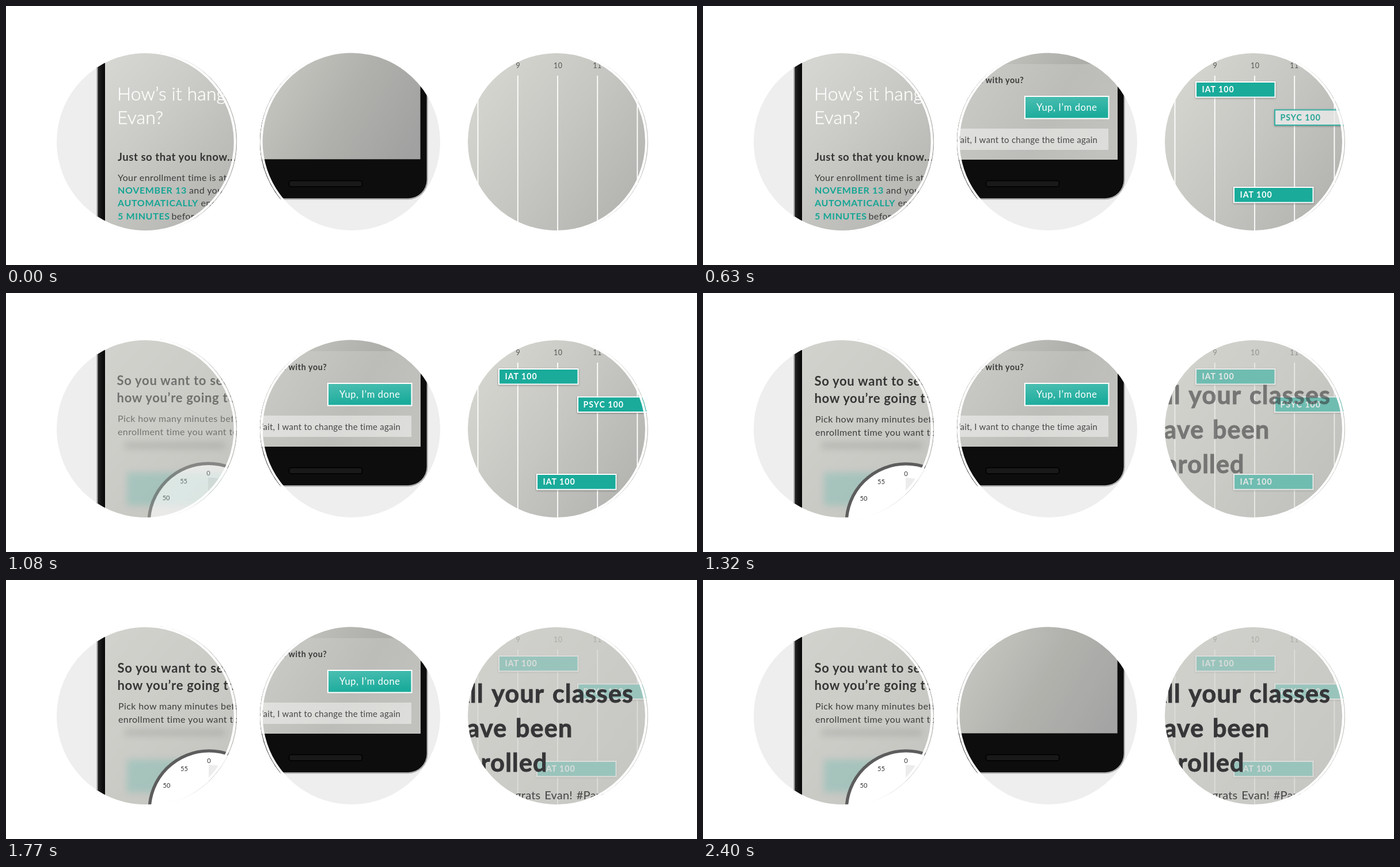
Animation, 1200 px wide and 450 px high, one loop 2430 ms. Source, as an HTML page:

```html
<!DOCTYPE html>
<html lang="en">
<head>
<meta charset="utf-8">
<title>Enrollment app close-ups</title>
<style>
html, body { margin: 0; width: 100%; height: 100%; overflow: hidden; background: #fff; }
svg { display: block; width: 1200px; height: 450px; font-family: Lato, "Open Sans", sans-serif; }
text { white-space: pre; }

.hello { font-size: 32px; font-weight: 300; fill: #fff; stroke: #fff; stroke-width: .4px; letter-spacing: .1px; }
.lead { font-size: 18.5px; font-weight: 700; fill: #333; letter-spacing: .55px; }
.body { font-size: 16px; fill: #3c3c3c; letter-spacing: .4px; }
.key { font-weight: 700; fill: #14a594; letter-spacing: .65px; }
.ask { font-size: 22px; font-weight: 700; fill: #353535; letter-spacing: .7px; }
.tick { font-size: 11px; fill: #333; text-anchor: middle; }
.hour { font-size: 12.5px; fill: #555; letter-spacing: .5px; text-anchor: middle; }
.big { font-size: 43px; font-weight: 700; fill: #363638; stroke: #363638; stroke-width: .9px; letter-spacing: 1.2px; word-spacing: 3px; }
.cheer { font-size: 20px; fill: #444; letter-spacing: .2px; word-spacing: 1.5px; }
.course { font-size: 14.2px; font-weight: 700; letter-spacing: 1px; }
.slot rect { stroke-width: 2; }
.slot { filter: drop-shadow(0 1px 1.5px rgba(0, 0, 0, .35)); }

/* every part shares one 2430 ms loop */
.a, .slot, .slot rect, .course { animation: 2430ms linear infinite both; }
.screen1 { animation-name: screen1; }
.veil1 { animation-name: veil1; }
.screen2 { animation-name: screen2; }
.panel { animation-name: panel; }
.inner { animation-name: inner; }
.yup { animation-name: yup; }
.wait { animation-name: wait; }
.slot { animation-name: slide; }
.slot rect { animation-name: solid; }
.course { animation-name: ink; }
.late { animation-name: slideLate; }
.late rect { animation-name: solidLate; }
.late .course { animation-name: inkLate; }
.veil2 { animation-name: veil2; }
.done { animation-name: done; }
.party { animation-name: party; }

@keyframes screen1 { 0%, 27.2% { opacity: 1 } 34.6%, 100% { opacity: 0 } }
@keyframes veil1 { 0%, 32% { opacity: 0 } 42%, 100% { opacity: 1 } }
@keyframes screen2 {
  0%, 39.5% { opacity: 0; transform: translate(-2.5px, -1.5px) }
  47.7%, 100% { opacity: 1; transform: none }
}
@keyframes panel {
  0%, 1.23% { transform: translateY(168px); opacity: 1; animation-timing-function: cubic-bezier(.16, 1, .3, 1) }
  9.9%, 90.5% { transform: none; opacity: 1 }
  100% { transform: translateY(-10px); opacity: 0 }
}
@keyframes inner { 0%, 84.4% { opacity: 1 } 92.6%, 100% { opacity: 0 } }
@keyframes yup {
  0%, 1.23% { transform: translateY(30px); animation-timing-function: cubic-bezier(.16, 1, .3, 1) }
  10.5%, 100% { transform: none }
}
@keyframes wait {
  0%, 1.23% { transform: translateY(60px); animation-timing-function: cubic-bezier(.16, 1, .3, 1) }
  13.6%, 100% { transform: none }
}
@keyframes slide {
  0%, 1.23% { transform: translateX(-60px); opacity: 0; animation-timing-function: cubic-bezier(.16, 1, .3, 1) }
  16.3%, 100% { transform: none; opacity: 1 }
}
@keyframes slideLate {
  0%, 3.7% { transform: translateX(-60px); opacity: 0; animation-timing-function: cubic-bezier(.16, 1, .3, 1) }
  18.8%, 100% { transform: none; opacity: 1 }
}
@keyframes solid {
  0%, 23% { fill: rgba(255, 255, 255, .75); stroke: #35b3a4 }
  25.5%, 100% { fill: #1aab9b; stroke: #fff }
}
@keyframes solidLate {
  0%, 31% { fill: rgba(255, 255, 255, .75); stroke: #35b3a4 }
  34%, 100% { fill: #1aab9b; stroke: #fff }
}
@keyframes ink { 0%, 23% { fill: #23a595 } 25.5%, 100% { fill: #fff } }
@keyframes inkLate { 0%, 31% { fill: #23a595 } 34%, 100% { fill: #fff } }
@keyframes veil2 { 0%, 46.9% { opacity: 0 } 58%, 100% { opacity: .7 } }
@keyframes done {
  0%, 49.4% { transform: translateY(-44px); opacity: 0; animation-timing-function: cubic-bezier(.3, .6, .6, 1) }
  54.3% { transform: translateY(-20px); opacity: .57; animation-timing-function: cubic-bezier(.2, .6, .5, 1) }
  64.2%, 100% { transform: none; opacity: 1 }
}
@keyframes party {
  0%, 61.7% { transform: translateY(-30px); opacity: 0; animation-timing-function: cubic-bezier(.2, .8, .3, 1) }
  75%, 100% { transform: none; opacity: 1 }
}
</style>
</head>
<body>
<svg viewBox="0 0 1200 450">
  <defs>
    <clipPath id="lens1"><circle cx="244" cy="236" r="157"/></clipPath>
    <clipPath id="lens2"><circle cx="598" cy="236" r="157"/></clipPath>
    <clipPath id="lens3"><circle cx="958" cy="236" r="157"/></clipPath>
    <clipPath id="glass"><rect x="430" y="70" width="289.6" height="196.5"/></clipPath>
    <linearGradient id="bg1" gradientUnits="userSpaceOnUse" x1="160" y1="130" x2="390" y2="340">
      <stop offset="0" stop-color="#d5d5d1"/><stop offset=".4" stop-color="#cacac6"/>
      <stop offset="1" stop-color="#b4b4b1"/>
    </linearGradient>
    <linearGradient id="bg2" gradientUnits="userSpaceOnUse" x1="460" y1="120" x2="700" y2="260">
      <stop offset="0" stop-color="#c6c6c1"/><stop offset=".5" stop-color="#b0b0ac"/>
      <stop offset="1" stop-color="#a1a1a1"/>
    </linearGradient>
    <linearGradient id="bg3" gradientUnits="userSpaceOnUse" x1="820" y1="140" x2="1080" y2="330">
      <stop offset="0" stop-color="#d5d5d0"/><stop offset=".5" stop-color="#c6c6c2"/>
      <stop offset="1" stop-color="#b5b5b2"/>
    </linearGradient>
    <linearGradient id="sheet" gradientUnits="userSpaceOnUse" x1="450" y1="120" x2="690" y2="260">
      <stop offset="0" stop-color="#cacac6"/><stop offset=".6" stop-color="#bcbcb8"/>
      <stop offset="1" stop-color="#c1c1bd"/>
    </linearGradient>
    <linearGradient id="teal" x1="0" y1="0" x2=".25" y2="1">
      <stop offset="0" stop-color="#4dbfb2"/><stop offset="1" stop-color="#1aab9b"/>
    </linearGradient>
    <linearGradient id="edge">
      <stop offset="0" stop-color="#262626"/><stop offset=".4" stop-color="#161616"/>
      <stop offset="1" stop-color="#070707"/>
    </linearGradient>
    <filter id="soft" x="-20%" y="-150%" width="140%" height="400%"><feGaussianBlur stdDeviation="6"/></filter>
  </defs>

  <!-- welcome and timer screens -->
  <circle cx="242" cy="236" r="154" fill="#eee"/>
  <g clip-path="url(#lens1)">
    <rect x="157.5" y="70" width="260" height="330" fill="#8a8a8a"/>
    <rect x="158.4" y="70" width="260" height="330" fill="#c8c8c8"/>
    <rect x="159.3" y="70" width="12.8" height="330" fill="url(#edge)"/>
    <rect x="172" y="70" width="240" height="330" fill="url(#bg1)"/>
    <g class="a screen1">
      <text class="hello" x="193" y="164">How’s it hanging,</text>
      <text class="hello" x="193" y="205">Evan?</text>
      <text class="lead" x="194" y="269">Just so that you know...</text>
      <g class="body">
        <text x="194" y="304">Your enrollment time is at</text>
        <text class="key" x="194" y="326">NOVEMBER 13</text><text x="318" y="326">and you will be</text>
        <text class="key" x="194" y="348">AUTOMATICALLY</text><text x="338.5" y="348">enrolled</text>
        <text class="key" x="194" y="371">5 MINUTES</text><text x="287.5" y="371">before it</text>
      </g>
    </g>
    <g class="a veil1">
      <rect x="172" y="70" width="240" height="330" fill="#cfcfca" opacity=".6"/>
      <rect x="206" y="259" width="174" height="12" fill="#333" opacity=".13" filter="url(#soft)"/>
      <rect x="210" y="312" width="200" height="57" fill="#1aab9b" opacity=".2" filter="url(#soft)"/>
    </g>
    <g class="a screen2">
      <text class="ask" x="193.5" y="161">So you want to see</text>
      <text class="ask" x="193.5" y="191">how you’re going to</text>
      <text class="body" x="195" y="225">Pick how many minutes before</text>
      <text class="body" x="195" y="248">enrollment time you want to</text>
      <circle cx="352.5" cy="400.4" r="103.5" fill="#fff" stroke="#5d5d5d" stroke-width="5.4"/>
      <path d="M352 401V321A80 80 0 0 1 432 401Z" fill="#ececec"/>
      <text class="tick" x="352.5" y="318">0</text>
      <text class="tick" x="309.5" y="332">55</text>
      <text class="tick" x="279" y="361">50</text>
    </g>
  </g>

  <!-- confirm sheet -->
  <circle cx="600" cy="236" r="154" fill="#eee"/>
  <g clip-path="url(#lens2)">
    <rect x="300" y="0" width="432.4" height="336.2" rx="34" fill="#888"/>
    <rect x="300" y="0" width="431.6" height="335.4" rx="33.5" fill="#c8c8c8"/>
    <rect x="300" y="0" width="430.7" height="334.2" rx="32.5" fill="#0d0d0d"/>
    <rect x="491.5" y="303.5" width="127" height="10.5" rx="4" fill="#191919" stroke="#000" stroke-width="1.6"/>
    <g clip-path="url(#glass)">
      <rect x="430" y="70" width="290" height="196.5" fill="url(#bg2)"/>
      <g class="a panel">
        <rect x="430" y="101" width="290" height="180" fill="url(#sheet)"/>
        <g class="a inner">
          <text x="455" y="134" font-size="14.3" font-weight="700" fill="#3a3a3a" letter-spacing=".6">Cool with you?</text>
          <g class="a yup">
            <rect x="559" y="157" width="145.5" height="38.5" fill="url(#teal)" stroke="#fff" stroke-width="2"/>
            <text x="579" y="182" font-size="16.5" fill="#fff" letter-spacing=".6">Yup, I’m done</text>
          </g>
          <g class="a wait">
            <rect x="400" y="213" width="304" height="37" fill="#fff" opacity=".45"/>
            <text x="431.5" y="238" font-size="15" fill="#484848" letter-spacing=".25">Wait, I want to change the time again</text>
          </g>
        </g>
      </g>
    </g>
  </g>

  <!-- timetable -->
  <g clip-path="url(#lens3)">
    <rect x="790" y="70" width="340" height="340" fill="url(#bg3)"/>
    <text class="hour" x="889.3" y="108">9</text>
    <text class="hour" x="958.8" y="108">10</text>
    <text class="hour" x="1027" y="108">11</text>
    <path d="M819.5 121V400M888.8 121V400M958 121V400M1027.2 121V400M1096.4 121V400" stroke="#fff" stroke-width="1.8"/>
    <g class="slot">
      <rect x="856" y="132" width="137.5" height="26.5"/>
      <text class="course" x="866.5" y="150.3">IAT 100</text>
    </g>
    <g class="slot late">
      <rect x="993" y="180.5" width="137.5" height="26.5"/>
      <text class="course" x="1002.5" y="198.6">PSYC 100</text>
    </g>
    <g class="slot">
      <rect x="922" y="315" width="137.5" height="26.5"/>
      <text class="course" x="932.5" y="333.3">IAT 100</text>
    </g>
    <rect class="a veil2" x="790" y="70" width="340" height="340" fill="#cfcfca"/>
    <g class="a done">
      <text class="big" x="775" y="212.5">All your classes</text>
      <text class="big" x="775" y="272.5">have been</text>
      <text class="big" x="775" y="333">enrolled</text>
    </g>
    <text class="a party cheer" x="848" y="381">Congrats Evan! #PartyTime</text>
  </g>

  <g fill="none" stroke="#fff" stroke-width="4">
    <path d="M157 105A156 156 0 1 1 157 367"/>
    <circle cx="956" cy="236" r="156"/>
    <path d="M482 338A156 156 0 1 1 735 158"/>
  </g>
</svg>
</body>
</html>
```
